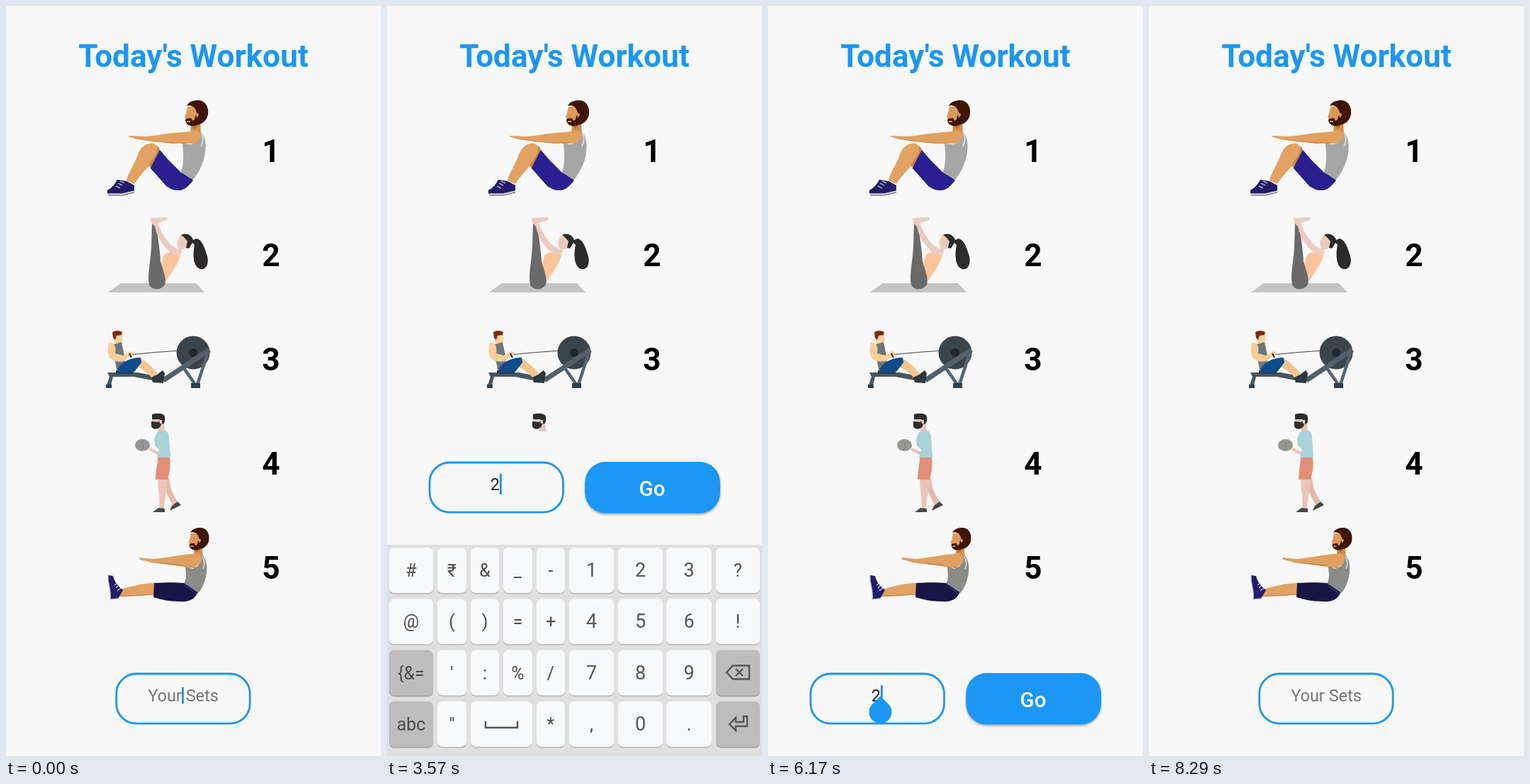
Write an HTML page that moves like this. It is 529 px wide and 1058 px high and loops after 8.56 s.

```html
<!DOCTYPE html>
<html lang="en">
<head>
<meta charset="utf-8">
<title>Today's Workout</title>
<style>
html, body { margin: 0; width: 100%; height: 100%; overflow: hidden; background: #f8f8f8; }
svg { display: block; width: 100vw; height: 100vh; }
text { font-family: Roboto, "Noto Sans", sans-serif; text-anchor: middle; }
.title { font: 700 44.1px Roboto, sans-serif; fill: #1c96f3; }
.num { font: 700 44.1px Roboto, sans-serif; fill: #000; }
.entry { font-size: 23.5px; fill: #222; }
.hint { fill: #757575; }
.go { font-size: 29.4px; font-weight: 500; fill: #fff; }
.key { font-size: 25px; fill: #4c4c4c; }
.digit { font-size: 27px; fill: #555; }
.icon { fill: none; stroke: #555; stroke-width: 2.4; }
</style>
</head>
<body>
<svg viewBox="0 0 529 1058" preserveAspectRatio="none">
<defs>
  <clipPath id="view"><rect id="viewBox" width="529" height="898"/></clipPath>
  <filter id="lift" x="-10%" y="-10%" width="120%" height="140%">
    <feDropShadow dx="0" dy="2" stdDeviation="1.6" flood-opacity=".35"/>
  </filter>
  <g id="head">
    <path fill="#d2904c" d="M261 163 274 161 275 182 260 183Z"/>
    <path fill="#b87338" d="M262 169 272 167 266 174Z"/>
    <path fill="#dc9a58" d="M256 142 270 142 272 158 265 166H255L254 160 252 157 254 151Z"/>
    <path fill="#3f1403" d="M255 141C257 135 265 133 271 133C280 133 286 141 285 151C285 159 279 165 273 167L266 169C260 170 254 168 253 161L254 159 261 158 263 162 266 160 267 155 270 153C268 148 268 145 264 142Q259 139 255 141Z"/>
    <path fill="#dc9a58" d="M255 162H260V164H255ZM268 152Q272 150 272 154L269 158Z"/>
  </g>
</defs>

<text class="title" x="264.5" y="86">Today's Workout</text>

<g clip-path="url(#view)">
  <g id="numbers"></g>

  <g id="situp">
    <use href="#head"/>
    <path fill="#a6a6a6" d="M261 195 268 192 275 178C282 184 283 198 280 212C277 226 270 238 263 246L246 237C252 222 250 208 249 194Z"/>
    <path fill="none" stroke="#e6e6e6" stroke-width="1.6" d="M276 180Q280 187 275 198"/>
    <path fill="#c88540" d="M172 184 186 188 206 191 236 194 262 194 272 190 240 187Z"/>
    <path fill="#e0a060" d="M172 183 196 184C212 183 224 180 238 179L259 177C271 173 276 179 274 186C271 194 260 195 250 193C235 193 215 191 200 189L184 187Z"/>
    <path fill="#c88540" d="M208 196C217 197 219 204 215 211L206 227 200 226Z"/>
    <path fill="#e2a264" d="M170 246C172 236 182 222 187 207C192 196 201 193 208 194C215 197 215 206 209 213C203 221 202 226 196 232C190 238 185 245 181 251Z"/>
    <path fill="#2b1f8f" d="M217 203 204 228 228 255Q234 260 242 260C252 261 258 253 264 246L247 235 229 217Z"/>
    <path fill="none" stroke="#1d1470" stroke-width="1.2" d="M204 228 228 255M247 236 263 246"/>
    <path fill="#221b68" d="M143 260C150 256 154 251 157 245L163 246 170 247 181 253V261L163 265 143 265Z"/>
    <path fill="none" stroke="#d8d8e4" stroke-width="1.2" d="M158 250 164 253M161 247 167 250M155 254 161 257"/>
    <path fill="none" stroke="#c4c4cc" stroke-width="1.6" d="M143 265 164 265 181 261"/>
    <path fill="none" stroke="#444" d="M144 267 164 267 181 263"/>
  </g>

  <g id="stretch">
    <path fill="#c4c4c4" d="M162 391H268L280 404H144Z"/>
    <path fill="#fcc49b" d="M223 351C230 345 239 347 246 351C243 365 233 376 226 388L218 381C219 370 219 359 223 351Z"/>
    <path fill="#6a6a6a" d="M206 306 212 312C215 330 217 345 218 360C221 372 227 384 224 393C219 401 206 402 202 393C199 380 204 360 205 340Z"/>
    <path fill="#ebcbc1" d="M204 299 228 298 227 302 214 306C221 324 229 336 241 342L246 347 238 353C225 342 214 331 210 311L205 306ZM241 333 246 323H257L259 332 255 342 248 343 247 351 242 347 243 342Z"/>
    <path fill="#2c2a2b" d="M247 323C253 319 262 323 264 330L269 328C277 330 280 341 284 353C287 366 280 373 274 371C264 368 263 352 266 337L263 334 258 342 254 341 256 332 251 326Z"/>
  </g>

  <g id="rower">
    <circle cx="264" cy="489" r="23.5" fill="#3a444b"/>
    <circle cx="264" cy="489" r="6" fill="#20282e"/>
    <path fill="#49565f" d="M143 517H186L222 524V531L180 523H151L148 535H142L146 523Z"/>
    <path fill="none" stroke="#566471" stroke-width="4.5" d="M251 511 267 534M285 488 270 534"/>
    <path fill="none" stroke="#53606c" stroke-width="7" d="M222 528 287 485"/>
    <path fill="#343e46" d="M141 534H149V539H141ZM261 532H274V539H261ZM155 514H180V519H155Z"/>
    <path fill="none" stroke="#444" d="M174 492Q212 488 247 486"/>
    <path fill="#fbd19e" d="M152 464 163 462 165 471 161 477 153 477Z"/>
    <path fill="#7a2b12" d="M150 460Q157 456 164 460L163 464 156 465 154 471 151 468Z"/>
    <path fill="#6f757a" d="M150 478 163 474 168 498 167 504 156 514C155 500 149 490 150 478Z"/>
    <path fill="#f9cf9a" d="M145 475C152 473 156 480 154 490L165 493 176 487 181 490 166 501C156 503 149 501 145 494C143 487 143 481 145 475Z"/>
    <path fill="#f3c48d" d="M188 497C198 500 207 511 214 518L206 525C200 517 193 513 186 509Z"/>
    <path fill="#0f4c8c" d="M157 513C162 502 178 495 190 496L191 503 181 516 162 518Z"/>
    <path fill="#2f3740" d="M205 524 213 520 221 514 224 518 222 532 207 531Z"/>
    <path stroke="#222" stroke-width="2" d="M174 490 177 496"/>
  </g>

  <g id="lifter">
    <path fill="#e9c6ba" d="M206 581H222L224 598 215 601 214 594 206 590ZM202 623 214 628 220 630 217 635 202 627Z"/>
    <path fill="#2d2d2f" d="M206 576C213 574 222 574 224 579C225 588 222 591 219 589L218 593C214 598 207 598 205 593V586L215 587 217 583H206Z"/>
    <path fill="#f0d2c8" d="M216 584H220V589H217Z"/>
    <path fill="#a9d3d9" d="M213 601C222 596 229 598 230 608L232 637H213L216 626 210 620 209 611Z"/>
    <path fill="#e5b9aa" d="M221 666H230C231 680 236 690 242 699L235 704C229 692 223 681 221 666Z"/>
    <path fill="#edc4b8" d="M214 666H228C228 682 223 696 223 709H216C218 694 214 682 214 666Z"/>
    <path fill="#e38f78" d="M214 637H231C233 650 230 660 228 668H211C211 656 214 646 214 637Z"/>
    <path fill="#444849" d="M207 714 215 708 224 709V714ZM231 712 234 705 242 699 247 704Z"/>
    <ellipse cx="192.5" cy="619.5" rx="10.5" ry="8.5" fill="#969694"/>
    <path fill="none" stroke="#7c7c7b" d="M189 612Q197 618 191 627"/>
  </g>

  <g id="vsit">
    <use href="#head" transform="translate(38.4 620.3) scale(.87)"/>
    <path fill="#8b8b88" d="M263 794 271 790 277 775C285 782 285 800 279 815C276 823 272 828 267 831L251 815C256 806 253 798 253 790Z"/>
    <path fill="none" stroke="#e2e2e2" stroke-width="1.5" d="M277 777Q282 785 278 794"/>
    <path fill="#c88540" d="M189 780 205 785 245 790 265 793 272 787Z"/>
    <path fill="#e0a060" d="M188 778 208 780C225 779 240 775 262 773C274 770 278 777 275 785C271 793 256 793 246 788C228 786 212 785 203 784L189 781Z"/>
    <path fill="#e2a264" d="M160 823C174 820 190 814 210 814V831C192 831 178 834 158 833Z"/>
    <path fill="none" stroke="#c88540" stroke-width="1.2" d="M160 832C178 832 192 831 208 830"/>
    <path fill="#191546" d="M209 814C225 813 240 813 251 814L270 827C267 837 258 841 245 840C230 840 218 837 208 834Z"/>
    <path fill="none" stroke="#342d7c" stroke-width="1.5" d="M252 816 268 829"/>
    <path fill="#221b68" d="M144 803 151 804C153 813 159 819 165 824L158 836 147 837C149 825 144 815 144 803Z"/>
    <path fill="none" stroke="#d8d8e4" stroke-width="1.2" d="M153 817 157 814M155 821 159 817M157 825 162 821"/>
    <path fill="none" stroke="#c4c4cc" stroke-width="1.3" d="M144 804C143 815 149 825 147 837L158 836"/>
  </g>
</g>

<g id="form">
  <g id="button" filter="url(#lift)">
    <rect x="279.3" y="941" width="190.7" height="72.5" rx="29" fill="#1c97f5"/>
    <text class="go" x="374" y="989">Go</text>
  </g>
  <g id="field">
    <rect x="155.7" y="942" width="188.4" height="70.2" rx="28" fill="#f8f8f8" stroke="#1f95ea" stroke-width="2.8"/>
    <text id="hint" class="entry hint" x="250" y="981">Your Sets</text>
    <text id="value" class="entry" x="248" y="981">2</text>
    <rect id="hintCaret" x="248" y="961" width="2.8" height="23" fill="#1f8fe8"/>
    <rect id="caret" x="254.6" y="958" width="2.8" height="29" fill="#1f8fe8"/>
    <path id="handle" fill="#1c97f5" d="M254.1 973.4l11.3 11.3a16 16 0 1 1-22.6 0z"/>
  </g>
</g>

<g id="keyboard"><rect y="760" width="529" height="298" fill="#e0e0e0"/></g>
</svg>

<script>
const LOOP = 8560, LIFT = 298, SHIFT = 95.6;
const $ = id => document.getElementById(id);

function add(parent, tag, attrs, label) {
  const el = document.createElementNS('http://www.w3.org/2000/svg', tag);
  for (const k in attrs) el.setAttribute(k, attrs[k]);
  if (label) el.textContent = label;
  parent.append(el);
  return el;
}

for (let i = 0; i < 5; i++)
  add($('numbers'), 'text', { class: 'num', x: 374, y: 220 + i * 147 }, String(i + 1));

// Keyboard: column edges, row labels
const cols = [[3, 65], [71, 112], [118, 158], [164, 205], [211, 251], [257, 320], [326, 389], [394, 458], [464, 526]];
const rows = ['# ₹ & _ - 1 2 3 ?', '@ ( ) = + 4 5 6 !', "{&= ' : % / 7 8 9 back", 'abc " space - * , 0 . enter'];
const icons = {
  back: 'M479 940 488 930.5H511V949.5H488ZM492 935 502 945M502 935 492 945',
  space: 'M139 1009V1018H184V1009',
  enter: 'M483 1013 492 1004V1010H503V1002H508V1016H492V1022Z'
};
const keys = {};
rows.forEach((row, r) => row.split(' ').forEach((label, c) => {
  if (r === 3 && c === 3) return;
  const x = cols[c][0], end = label === 'space' ? 205 : cols[c][1];
  const y = 764 + r * 72.3, w = end - x;
  const side = r > 1 && (c === 0 || c === 8);
  add($('keyboard'), 'rect', { x, y: y + 1.8, width: w, height: 64, rx: 7, fill: side ? '#a8a8a8' : '#bdbdbd' });
  keys[label] = add($('keyboard'), 'rect', { x, y, width: w, height: 64, rx: 7, fill: side ? '#bdbdbd' : '#f8f9fa' });
  if (icons[label]) add($('keyboard'), 'path', { class: 'icon', d: icons[label] });
  else add($('keyboard'), 'text', { class: /\d/.test(label) ? 'key digit' : 'key', x: x + w / 2, y: y + 41 }, label);
}));

const ease = p => (1 - Math.cos(Math.PI * p)) / 2;
const ramp = (t, a, b) => ease(Math.min(1, Math.max(0, (t - a) / (b - a))));
const within = (t, spans) => spans.some(([a, b]) => t >= a && t < b);
const show = (id, on) => $(id).setAttribute('visibility', on ? 'visible' : 'hidden');
const move = (id, x, y) => $(id).setAttribute('transform', `translate(${x} ${y})`);

const hintOn = [[0, 350], [840, 1340], [1780, 2250], [2680, 2760], [7000, 7420]];
const caretOn = [[2760, 3300], [3570, 4090], [4600, 4920], [5130, 5550], [5820, 6400]];

function draw(t) {
  const typed = t >= 2760 && t < 7000;
  const raised = within(t, [[1900, 4410], [6330, 8030]]);
  const board = ramp(t, 1840, 1990) - ramp(t, 4410, 4700) + ramp(t, 6250, 6480) - ramp(t, 8030, 8270);
  const slide = ramp(t, 2760, 3060) - ramp(t, 7000, 7260);
  const fade = ramp(t, 2860, 3160) - ramp(t, 7000, 7180);

  move('form', 0, raised ? -LIFT : 0);
  $('viewBox').setAttribute('height', raised ? 600 : 898);
  move('field', -SHIFT * slide, 0);
  $('button').setAttribute('opacity', fade);
  show('hint', !typed);
  show('value', typed);
  show('hintCaret', within(t, hintOn));
  show('caret', within(t, caretOn));
  show('handle', t >= 6170 && t < 7000);
  move('keyboard', 0, LIFT * (1 - board));
  show('keyboard', board > 0.001);
  keys[2].setAttribute('fill', within(t, [[2680, 2800]]) ? '#d4d5d6' : '#f8f9fa');
  keys.back.setAttribute('fill', within(t, [[6720, 7040]]) ? '#9e9e9e' : '#bdbdbd');
}

const start = performance.now();
function tick() {
  draw((performance.now() - start) % LOOP);
  requestAnimationFrame(tick);
}
tick();
</script>
</body>
</html>
```
